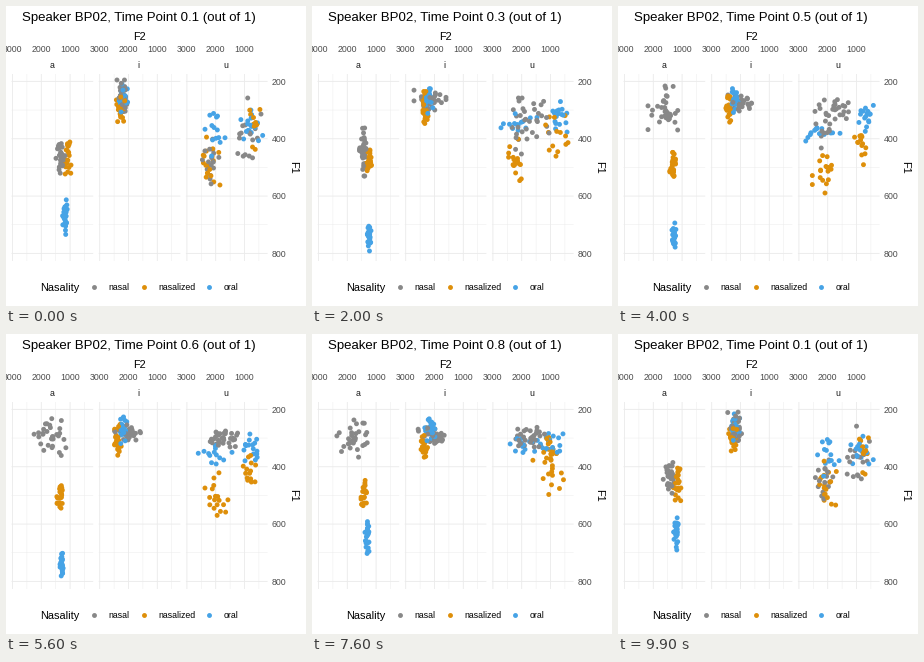
These frames come from a looping animation (300x300 px, 10 s). A matplotlib script:

```python
import matplotlib.pyplot as plt
import numpy as np
from matplotlib.animation import FuncAnimation

SIZE, DPI = 300, 72
STEPS, PER_STEP, HOLD = 10, 10, 5
FRAMES = STEPS * PER_STEP
plt.rcParams["font.family"] = "Liberation Sans"
GREY, ORANGE, BLUE = "#888888", "#DE8F0A", "#46A3E6"

rng = np.random.default_rng(11)
clouds, colors = [], []


def add_cloud(color, count, keys):
    """Dots around a drifting centre; keys map a time step to (x, y, sd x, sd y)."""
    keys = {**keys, STEPS + 1: keys[1]}
    shape = np.array([np.interp(range(1, STEPS + 1), list(keys), column)
                      for column in zip(*keys.values())]).T[:, None]
    # Each dot keeps most of its own offset and wobbles a little per step.
    own = rng.normal(size=(1, count, 2))
    wobble = rng.normal(size=(STEPS, count, 2))
    noise = np.clip(0.8 * own + 0.6 * wobble, -2, 2)
    clouds.append(shape[..., :2] + shape[..., 2:] * noise)
    colors.extend([color] * count)


# Vowel a
add_cloud(BLUE, 26, {1: (59, 211, 1.2, 10), 3: (57, 231, 1, 7), 6: (55.5, 233, 1, 8),
                     8: (55.5, 211, 1.2, 9), 10: (54, 145, 1.5, 12)})
add_cloud(ORANGE, 24, {1: (61, 152, 2, 8), 3: (56.5, 156, 1.5, 6),
                       8: (52, 164, 1.3, 7), 10: (50, 142, 2, 14)})
add_cloud(GREY, 32, {1: (55, 152, 2.5, 8), 3: (51.5, 146, 2, 12),
                     5: (46, 102, 8, 11), 10: (42, 105, 10, 9)})

# Vowel i
add_cloud(BLUE, 24, {1: (117, 92, 2.3, 7), 5: (117, 96, 1.6, 7), 10: (119, 98, 3.5, 6)})
add_cloud(ORANGE, 24, {1: (115, 101, 2.3, 8), 5: (111.5, 102, 1.8, 8),
                       8: (112, 109, 2, 9), 10: (117, 107, 3.5, 8)})
add_cloud(GREY, 32, {1: (116, 90, 2.5, 8), 3: (118, 94, 8, 5),
                     5: (122, 97, 6, 4), 10: (120, 105, 8, 4)})

# Vowel u: a front and a back clump for each kind
add_cloud(BLUE, 14, {1: (209, 122, 5, 14), 3: (207, 117, 9, 9), 5: (204, 126, 9, 5),
                     8: (214, 113, 9, 7), 10: (216, 103, 9, 5)})
add_cloud(BLUE, 17, {1: (243, 118, 7, 9), 3: (248, 110, 5, 9),
                     6: (246, 113, 5, 8), 10: (233, 103, 8, 6)})
add_cloud(ORANGE, 18, {1: (204, 155, 5, 12), 3: (203, 155, 5, 11),
                       6: (207, 168, 6, 12), 8: (237, 128, 8, 18), 10: (232, 125, 6, 15)})
add_cloud(ORANGE, 14, {1: (247, 122, 4, 16), 3: (242, 130, 7, 13),
                       6: (243, 142, 4, 16), 8: (240, 122, 3, 12), 10: (234, 117, 3, 12)})
add_cloud(GREY, 16, {1: (204, 157, 5, 13), 3: (208, 120, 4, 14),
                     5: (207, 118, 5, 12), 6: (211, 107, 6, 5), 10: (214, 103, 9, 5)})
add_cloud(GREY, 18, {1: (241, 124, 7, 16), 3: (222, 109, 8, 12),
                     5: (220, 101, 6, 6), 10: (227, 103, 8, 5)})

order = rng.permutation(len(colors))
poses = np.concatenate(clouds, axis=1)[:, order]
colors = np.array(colors)[order]


def dots_at(frame):
    """Rest, then move evenly on; the last two rests creep slowly."""
    step, part = divmod(frame, PER_STEP)
    creep = 0.1 if step >= STEPS - 2 else 0
    move = np.interp(part, [0, HOLD, PER_STEP], [0, creep, 1])
    a, b = poses[step], poses[(step + 1) % STEPS]
    return a + (b - a) * move


fig = plt.figure(figsize=(SIZE / DPI, SIZE / DPI), dpi=DPI, facecolor="white")
ax = fig.add_axes([0, 0, 1, 1])
ax.set_xlim(0, SIZE)
ax.set_ylim(SIZE, 0)
ax.axis("off")

TOP, BOTTOM, WIDTH, GAP = 68, 255, 81.7, 5.5
MIDDLE = 133.2


def f2_x(left, hz):
    return left + 1 + (3000 - hz) * 0.0288


def f1_y(hz):
    return 75.4 + (hz - 200) * 0.2867


def label(x, y, text, size=8.8, color="black", ha="center", **kw):
    return ax.text(x, y, text, fontsize=size, color=color, ha=ha,
                   va=kw.pop("va", "baseline"), **kw)


def grid(xs, ys, major):
    ax.plot(xs, ys, color="#EBEBEB", lw=0.9 if major else 0.45,
            solid_capstyle="butt", snap=False, zorder=1)


for k, vowel in enumerate("aiu"):
    left = GAP + k * (WIDTH + GAP)
    for hz in range(200, 801, 100):
        grid([left, left + WIDTH], [f1_y(hz)] * 2, hz % 200 == 0)
    for hz in range(500, 3001, 500):
        grid([f2_x(left, hz)] * 2, [TOP, BOTTOM], hz % 1000 == 0)
    for hz in (3000, 2000, 1000):
        label(f2_x(left, hz), 45.6, str(hz), color="#4D4D4D")
    label(left + WIDTH / 2 - 0.7, 62, vowel, color="#1A1A1A")

for hz in range(200, 801, 200):
    label(265.8, f1_y(hz) + 3.2, str(hz), color="#4D4D4D", ha="left")
label(MIDDLE, 34.5, "F2", 11)
label(286.8, 161.5, "F1", 11, va="center", rotation=-90)

label(34.4, 285, "Nasality", 11, ha="left")
for x, name, color in [(88.2, "nasal", GREY), (137.8, "nasalized", ORANGE),
                       (203, "oral", BLUE)]:
    ax.scatter([x], [281], s=24, c=color, linewidths=0, zorder=3)
    label(x + 14.2, 284.2, name, ha="left")

title = label(MIDDLE, 15.2, "", 13.2)
dots = ax.scatter(*poses[0].T, s=24, c=colors, linewidths=0, zorder=3)


def draw(frame):
    nearest = (frame + 2) // PER_STEP % STEPS + 1
    title.set_text(f"Speaker BP02, Time Point {nearest / STEPS:g} (out of 1)")
    dots.set_offsets(dots_at(frame))
    return title, dots


anim = FuncAnimation(fig, draw, frames=FRAMES, interval=100, repeat=True,
                     repeat_delay=0, blit=False)
plt.show()
```
